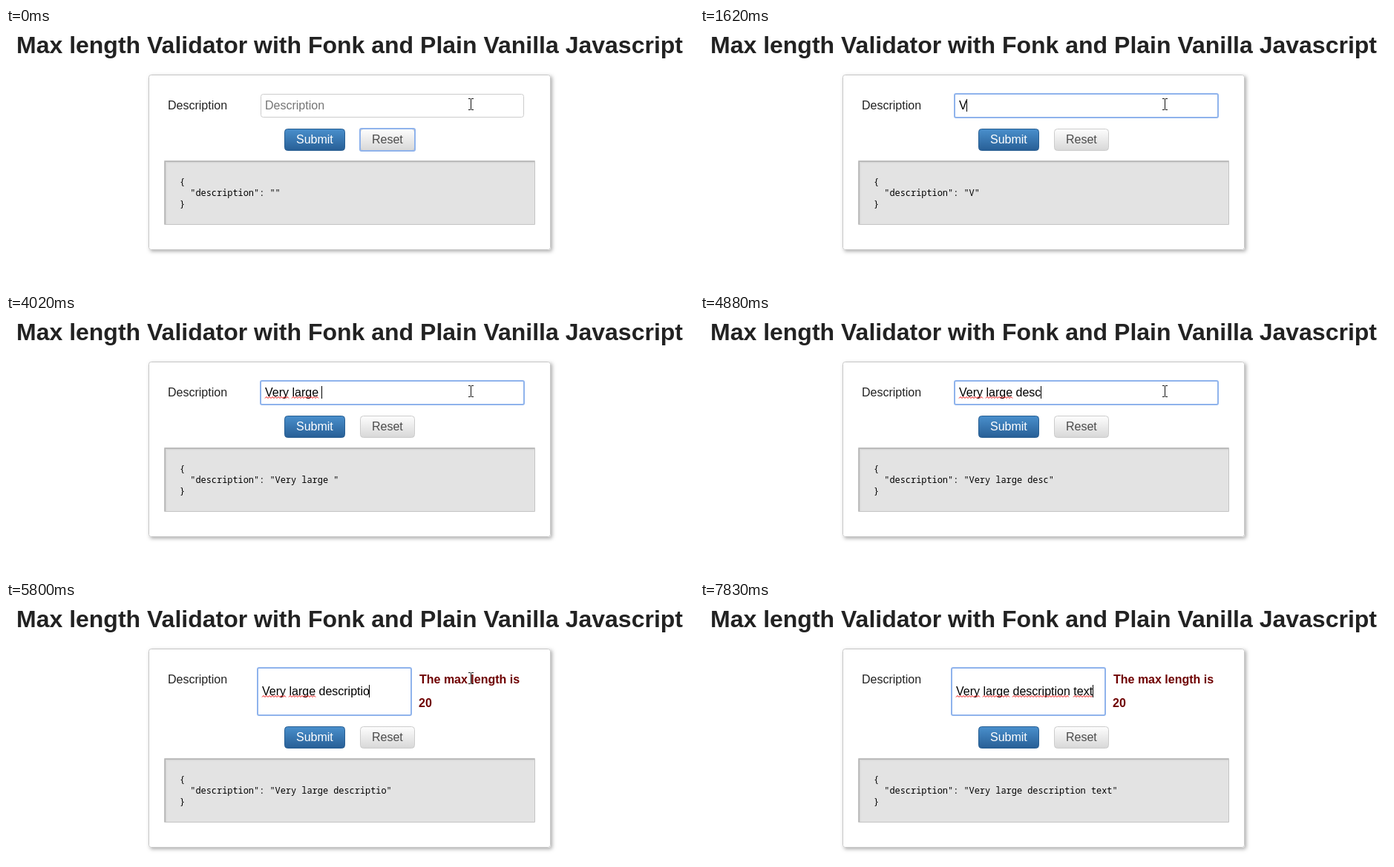
An HTML page with a canvas for the animation above (8 s loop, 927x350 px).

```html
<!DOCTYPE html>
<html lang="en">
<head>
<meta charset="utf-8">
<title>Max length Validator</title>
<style>
  html, body { margin: 0; width: 100%; height: 100%; overflow: hidden; background: #fff; }
  canvas { display: block; }
</style>
</head>
<body>
<canvas id="stage" width="927" height="350"></canvas>
<script>
const ctx = document.getElementById('stage').getContext('2d', { alpha: false });
const LOOP = 8000;
const SANS = '16px "Liberation Sans", Arial, sans-serif';
const BOLD = 'bold ' + SANS;
const TITLE = 'bold 32px "Liberation Sans", Arial, sans-serif';
const MONO = '11.92px "Noto Sans Mono", "DejaVu Sans Mono", monospace';

const MESSAGE = 'Very large description text';
const MAX_LENGTH = 20;
const FOCUS = 610;
// Moment at which each character of the message is typed.
const KEY_TIMES = [
  1620, 1940, 2170, 2550, 2700, 3010, 3180, 3340, 3560, 3790, 4020,
  4340, 4500, 4670, 4840, 5010, 5170, 5340, 5570, 5720, 5800, 5950,
  6090, 6230, 6370, 6500, 6730
];
// Words flagged by the spell checker: first character, end, moment.
const MISSPELT = [[0, 4, 2860], [5, 10, 4020], [11, 22, 6090], [23, 27, 7830]];

function text(str, x, y, font, color) {
  ctx.font = font;
  ctx.fillStyle = color;
  ctx.fillText(str, x, y);
}

function widthOf(str) {
  ctx.font = SANS;
  return ctx.measureText(str).width;
}

// Box whose outer edges are given, with a border drawn inside them.
function box(x, y, w, h, radius, fill, border, line = 1) {
  ctx.beginPath();
  ctx.roundRect(x + line / 2, y + line / 2, w - line, h - line, radius);
  ctx.fillStyle = fill;
  ctx.fill();
  ctx.strokeStyle = border;
  ctx.lineWidth = line;
  ctx.stroke();
}

function vertical(y, h, top, bottom) {
  const g = ctx.createLinearGradient(0, y, 0, y + h);
  g.addColorStop(0, top);
  g.addColorStop(1, bottom);
  return g;
}

function drawPanel(shift) {
  ctx.save();
  ctx.shadowColor = 'rgba(0,0,0,0.32)';
  ctx.shadowBlur = 5;
  ctx.shadowOffsetX = ctx.shadowOffsetY = 2;
  ctx.fillStyle = '#fff';
  ctx.beginPath();
  ctx.roundRect(192, 63, 542, 237 + shift, 3);
  ctx.fill();
  ctx.restore();
  box(192, 63, 542, 237 + shift, 3, '#fff', '#c8c8c8');
}

function drawButtons(shift, resetFocused) {
  const y = 136 + shift;
  box(375, y, 82, 30, 4, vertical(y, 30, '#4a90cd', '#275e95'), '#285e92');
  text('Submit', 391, y + 20, SANS, '#fff');
  box(477, y, 74, 30, 4, vertical(y, 30, '#fefefe', '#d7d7d7'), '#ccc');
  if (resetFocused) box(476, y - 1, 76, 32, 2, 'transparent', '#8fb3ec', 2);
  text('Reset', 493, y + 20, SANS, '#4c4c4c');
}

function drawOutput(typed, shift) {
  const y = 179 + shift;
  box(213, y, 500, 87, 0, '#e3e3e3', '#c4c4c4');
  for (let i = 1; i < 4; i++) {
    ctx.fillStyle = `rgba(0,0,0,${0.2 / (i * i)})`;
    ctx.fillRect(213 + i, y + i, 499 - i, 1);
    ctx.fillRect(213 + i, y + i + 1, 1, 85 - i);
  }
  ['{', `  "description": "${typed}"`, '}'].forEach((line, i) =>
    text(line, 234, y + 33 + 15 * i, MONO, '#000'));
}

function squiggle(from, to, y) {
  ctx.beginPath();
  for (let x = from; x <= to; x += 2) {
    ctx.lineTo(x, y + ((x - from) % 4 ? -1 : 1));
  }
  ctx.strokeStyle = '#f00000';
  ctx.lineWidth = 1;
  ctx.stroke();
}

function drawInput(t, typed, invalid) {
  const focused = t >= FOCUS;
  const x = invalid ? 345 : 349;
  const baseline = invalid ? 126 : 110;

  if (invalid) box(338, 88, 209, 66, 2, '#fff', '#8fb3ec', 2);
  else if (focused) box(342, 88, 357, 34, 2, '#fff', '#8fb3ec', 2);
  else box(343, 89, 355, 32, 3, '#fff', '#ccc');

  if (typed) text(typed, x, baseline, SANS, '#000');
  else text('Description', x, baseline, SANS, '#757575');

  for (const [first, end, time] of MISSPELT) {
    if (t < time) continue;
    const left = Math.round(x + widthOf(MESSAGE.slice(0, first)));
    squiggle(left, x + widthOf(MESSAGE.slice(0, end)), baseline + 1.5);
  }

  const blinkedOff = (t >= 1070 && t < 1620) || (t >= 7280 && t < 7830);
  if (focused && !blinkedOff) {
    ctx.fillStyle = '#000';
    ctx.fillRect(Math.floor(x + widthOf(typed)), baseline - (typed ? 14 : 13), 1, 17);
  }
}

function drawIBeam(x, y) {
  ctx.fillStyle = '#111';
  ctx.fillRect(x, y - 7, 1, 14);
  for (const edge of [y - 8, y + 7]) {
    ctx.fillRect(x - 3, edge, 3, 1);
    ctx.fillRect(x + 1, edge, 3, 1);
  }
}

function drawArrow(x, y) {
  const outline = [[0, 0], [0, 16], [4, 12], [7, 18], [9, 17], [6, 11], [11, 11]];
  ctx.beginPath();
  outline.forEach(([dx, dy]) => ctx.lineTo(x + dx + 0.5, y + dy + 0.5));
  ctx.closePath();
  ctx.fillStyle = '#fff';
  ctx.fill();
  ctx.strokeStyle = '#000';
  ctx.lineWidth = 1;
  ctx.stroke();
}

function draw(t) {
  const typed = MESSAGE.slice(0, KEY_TIMES.filter(time => time <= t).length);
  const invalid = typed.length > MAX_LENGTH;
  const shift = invalid ? 32 : 0;

  ctx.fillStyle = '#fff';
  ctx.fillRect(0, 0, 927, 350);
  ctx.textAlign = 'center';
  text('Max length Validator with Fonk and Plain Vanilla Javascript', 463, 34, TITLE, '#222');
  ctx.textAlign = 'left';

  drawPanel(shift);
  text('Description', 218, 110, SANS, '#222');
  drawInput(t, typed, invalid);
  if (invalid) {
    text('The max length is', 557, 110, BOLD, '#6f0000');
    text('20', 556, 142, BOLD, '#6f0000');
  }
  drawButtons(shift, t < FOCUS);
  drawOutput(typed, shift);

  if (t < 7680) drawIBeam(626, 103);
  else if (t < 7760) drawArrow(618, 53);
}

function tick(now) {
  draw(now % LOOP);
  requestAnimationFrame(tick);
}
draw(0);
requestAnimationFrame(tick);
</script>
</body>
</html>
```
